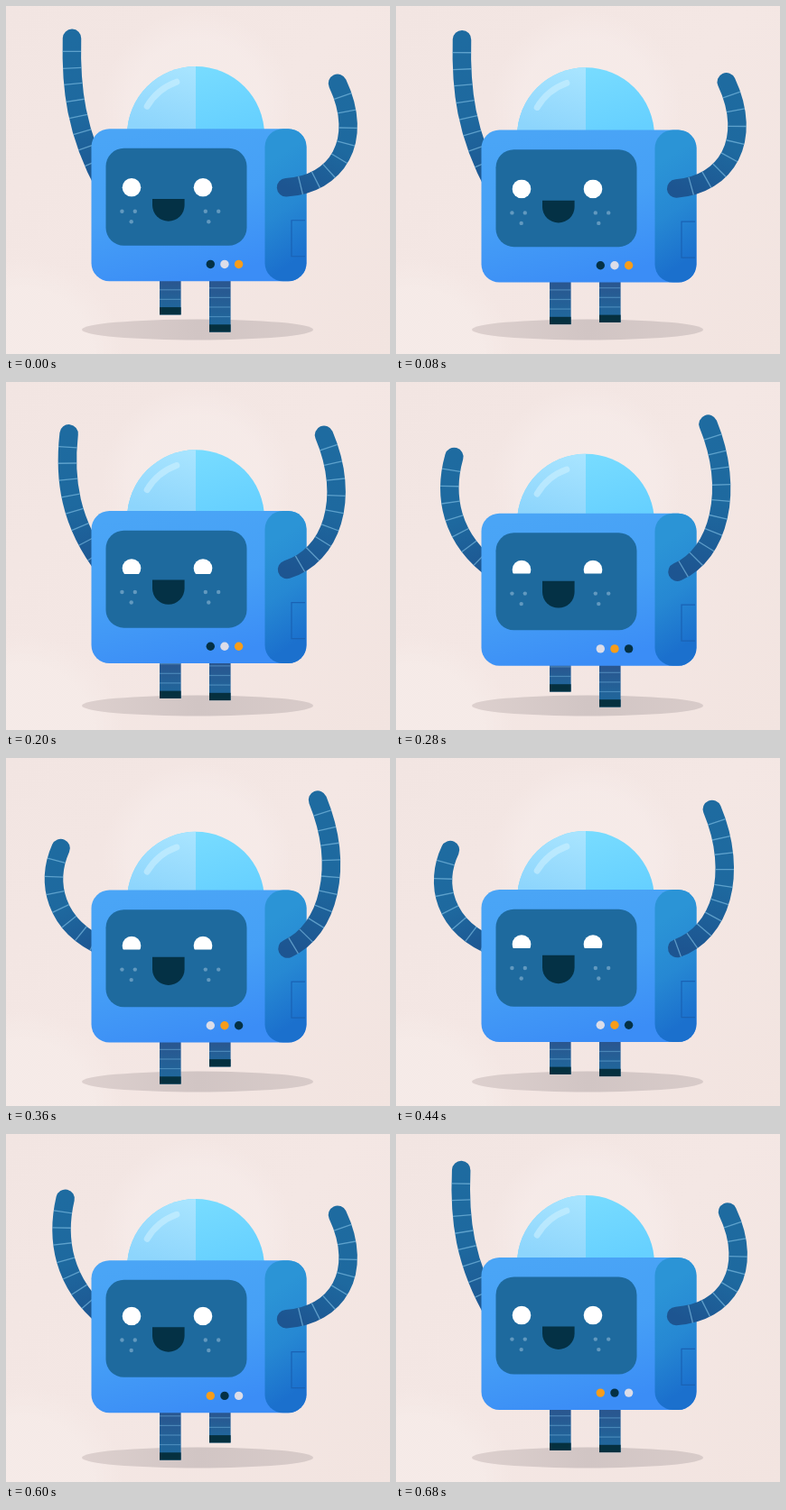
An HTML page with a canvas that plays this animation: 425x386 px, repeating every 0.72 s.

```html
<!DOCTYPE html>
<html lang="en">
<head>
<meta charset="utf-8">
<title>Dancing robot</title>
<style>
  html, body { margin: 0; width: 100%; height: 100%; overflow: hidden; background: #f3e5e2; }
  canvas { display: block; width: 425px; height: 386px; }
</style>
</head>
<body>
<canvas id="stage"></canvas>
<script>
const W = 425, H = 386, LOOP = 720, STEP = 40, TAU = Math.PI * 2;
const canvas = document.getElementById('stage');
const g = canvas.getContext('2d');
const dpr = window.devicePixelRatio || 1;
canvas.width = W * dpr;
canvas.height = H * dpr;
g.scale(dpr, dpr);

const clamp = (v, lo, hi) => Math.max(lo, Math.min(hi, v));

// One bob per loop; `broad` flattens the crests
function wave(t, mean, amp, peak, broad = 0) {
  const a = TAU * (t - peak) / LOOP;
  return mean + amp * Math.cos(a) - broad * Math.cos(2 * a);
}

function ease(t, from, to) {
  const x = clamp((t - from) / (to - from), 0, 1);
  return x * x * x * (x * (6 * x - 15) + 10);
}

const mix = (a, b, u) => a.map((p, i) => p.map((c, k) => c + (b[i][k] - c) * u));

function linear(x0, y0, x1, y1, ...colors) {
  const grad = g.createLinearGradient(x0, y0, x1, y1);
  colors.forEach((c, i) => grad.addColorStop(i / (colors.length - 1), c));
  return grad;
}

function glow(x, y, r, color, clear) {
  const grad = g.createRadialGradient(x, y, 0, x, y, r);
  grad.addColorStop(0, color);
  grad.addColorStop(0.7, color);
  grad.addColorStop(1, clear);
  g.fillStyle = grad;
  g.fillRect(0, 0, W, H);
}

function box(x, y, w, h, r, fill) {
  g.beginPath();
  g.moveTo(x + r, y);
  g.arcTo(x + w, y, x + w, y + h, r);
  g.arcTo(x + w, y + h, x, y + h, r);
  g.arcTo(x, y + h, x, y, r);
  g.arcTo(x, y, x + w, y, r);
  g.closePath();
  g.fillStyle = fill;
  g.fill();
}

function dot(x, y, r, fill) {
  g.beginPath();
  g.arc(x, y, r, 0, TAU);
  g.fillStyle = fill;
  g.fill();
}

function line(x0, y0, x1, y1) {
  g.beginPath();
  g.moveTo(x0, y0);
  g.lineTo(x1, y1);
  g.stroke();
}

// Round tube along a cubic, tip first, with rings at even distances
function arm([a, b, c, d]) {
  const point = u => [0, 1].map(k => {
    const v = 1 - u;
    return a[k] * v * v * v + 3 * b[k] * v * v * u + 3 * c[k] * v * u * u + d[k] * u * u * u;
  });
  g.lineCap = 'round';
  g.lineWidth = 20.5;
  g.strokeStyle = linear(...a, ...d, '#1e6ba0', '#1e699f', '#1d5591');
  g.beginPath();
  g.moveTo(...a);
  g.bezierCurveTo(...b, ...c, ...d);
  g.stroke();

  g.lineCap = 'butt';
  g.lineWidth = 1.3;
  g.strokeStyle = 'rgba(128,190,228,.65)';
  let prev = a, run = 0, next = 14.5;
  for (let i = 1; i <= 200; i++) {
    const p = point(i / 200);
    const dx = p[0] - prev[0], dy = p[1] - prev[1], len = Math.hypot(dx, dy);
    run += len;
    if (run >= next) {
      const nx = -dy / len * 10.2, ny = dx / len * 10.2;
      line(p[0] - nx, p[1] - ny, p[0] + nx, p[1] + ny);
      next += 18;
    }
    prev = p;
  }
}

function leg(x, top, foot) {
  const w = 23.6;
  g.fillStyle = linear(0, top, 0, foot, '#2a568f', '#1e6a9e');
  g.fillRect(x, top - 10, w, foot - top + 10);
  g.strokeStyle = 'rgba(110,175,220,.5)';
  g.lineWidth = 1.2;
  for (let y = foot - 17; y > top; y -= 10.6) line(x, y, x + w, y);
  g.fillStyle = '#05303f';
  g.fillRect(x, foot - 8.3, w, 8.3);
}

function backdrop() {
  g.fillStyle = linear(0, 0, W, H, '#f2e5e2', '#f4e7e4', '#f2e4e0');
  g.fillRect(0, 0, W, H);
  glow(212, 110, 105, 'rgba(246,235,233,.8)', 'rgba(246,235,233,0)');
  glow(20, 390, 110, 'rgba(246,236,233,.7)', 'rgba(246,236,233,0)');
  g.beginPath();
  g.ellipse(212, 359, 128, 11.5, 0, 0, TAU);
  g.fillStyle = linear(84, 0, 340, 0, '#ddd0ce', '#d1c5c4', '#d8cbc9');
  g.fill();
}

function dome(top) {
  const x = 210, r = 76, cy = top + r;
  const half = (from, to, fill) => {
    g.beginPath();
    g.arc(x, cy, r, from, to);
    g.lineTo(x, cy);
    g.fillStyle = fill;
    g.fill();
  };
  half(Math.PI, TAU, linear(x, top, x + 20, cy, '#78dcff', '#66d0ff'));
  half(Math.PI, Math.PI * 1.5, linear(x, top, x - 20, cy, '#a9e5ff', '#8dd5fc'));
  g.beginPath();
  g.arc(x, cy, 62.5, Math.PI * 1.17, Math.PI * 1.39);
  g.strokeStyle = 'rgba(210,243,255,.55)';
  g.lineWidth = 7;
  g.lineCap = 'round';
  g.stroke();
  g.lineCap = 'butt';
}

function shell(y) {
  box(94.5, y, 238, 169, 20, linear(160, y, 200, y + 169, '#4aa5f6', '#46a0f6', '#3b8df6'));
  box(286.5, y, 46, 169, 20, linear(286, y + 40, 345, y + 130, '#2b94d6', '#2688d3', '#1b70cd'));
  g.strokeStyle = '#1a62b4';
  g.lineWidth = 1.2;
  g.beginPath();
  g.moveTo(331, y + 101.5);
  g.lineTo(316, y + 101.5);
  g.lineTo(316, y + 141.5);
  g.lineTo(331, y + 141.5);
  g.stroke();
  box(110.5, y + 21.6, 156, 108, 20, '#1e6a9e');
}

function face(t) {
  const eye = wave(t, 204.7, 3.6, 320);
  const open = clamp(wave(t, 18, -6, 360), 15, 21);
  g.save();
  g.beginPath();
  g.rect(110, eye - 10.5, 156, open);
  g.clip();
  for (const x of [139, 218]) dot(x, eye, 10.3, '#fff');
  g.restore();

  // Each cheek: two freckles above, one below
  for (const x of [135.6, 228]) {
    for (const dx of [-7.2, 7.2]) dot(x + dx, eye + 26.5, 2.2, '#6299bf');
  }
  for (const x of [138.7, 224.3]) dot(x, eye + 38, 2.2, '#6299bf');

  const top = wave(t, 217.3, 3.7, 310);
  const low = top + wave(t, 28.2, 3.5, 400) - 18;
  g.beginPath();
  g.moveTo(162, top);
  g.lineTo(197.6, top);
  g.lineTo(197.6, low);
  g.arc(179.8, low, 17.8, 0, Math.PI);
  g.closePath();
  g.fillStyle = '#043145';
  g.fill();
}

// Arm poses, tip to shoulder, measured from the top of the shell
const leftUp = [[73, -100.4], [71.5, -46], [77, 4], [110, 65]];
const leftDown = [[60, -44], [43, -8], [51, 41], [110, 64]];
const rightDown = [[367, -50.4], [397, 13.6], [366, 61.6], [310, 65]];
const rightUp = [[345, -100], [375, -25.6], [357, 44.4], [311.5, 65]];
const lamps = ['#043145', '#dcdde8', '#f79d1a'];

function draw(t) {
  const body = wave(t, 142, 5.2, 370, 0.6);
  const stride = 10.5 * Math.cos(TAU * (t - 16) / 240);
  const place = pts => pts.map(([x, y]) => [x, y + body]);

  backdrop();
  arm(place(mix(leftUp, leftDown, ease(t, 70, 425) - ease(t, 487, 730))));
  leg(170, body + 169, 352 - stride);
  leg(225, body + 169, 352 + stride);
  dome(wave(t, 74.7, 7.5, 375, 0.3));
  shell(body);
  face(t);

  const shift = Math.floor(t / 240);
  for (let i = 0; i < 3; i++) dot(226.3 + i * 15.65, body + 150.2, 4.7, lamps[(i + shift) % 3]);

  arm(place(mix(rightDown, rightUp, ease(t, 20, 320) - ease(t, 350, 615))));
}

const start = performance.now();
function tick() {
  const t = (performance.now() - start) % LOOP;
  draw(Math.floor(t / STEP) * STEP);
  requestAnimationFrame(tick);
}
tick();
</script>
</body>
</html>
```
